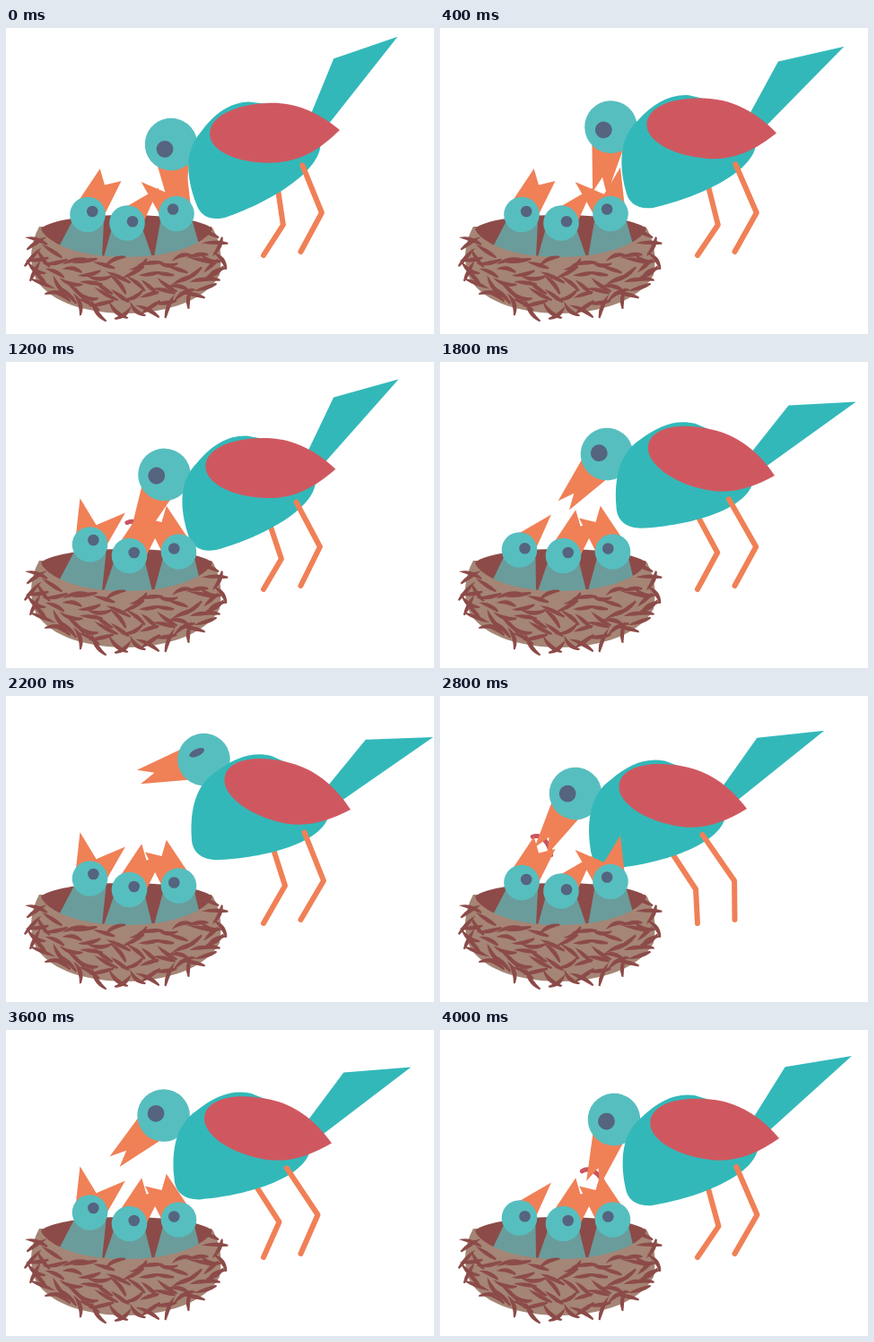
These frames come from a looping animation (477 by 342 pixels, 4.2 s). An HTML page:

```html
<!DOCTYPE html>
<html lang="en">
<head>
<meta charset="utf-8">
<title>Feeding time</title>
<style>
  html, body { margin: 0; width: 100%; height: 100%; overflow: hidden; background: #fff; }
  svg { display: block; width: 477px; height: 342px; }
  .teal { fill: #33b8b9; }
  .pale { fill: #57bebf; }
  .orange { fill: #f08056; }
  .eye { fill: #55647f; }
  .dark { fill: #8c4b48; }
  .straw { fill: #a58575; }
  .down { fill: #6a9c9b; }
  .leg { fill: none; stroke: #f08056; stroke-width: 6; stroke-linecap: round; stroke-linejoin: round; }
</style>
</head>
<body>
<svg viewBox="0 0 477 342">
  <polyline id="farLeg" class="leg"/>
  <g id="head">
    <path id="worm" d="M66 16C58 10 62 -4 73 -12" fill="none" stroke="#c9545f" stroke-width="5" stroke-linecap="round"/>
    <path class="orange" d="M20 -18L75 -8L57 0L75 8L20 18Z"/>
    <circle class="pale" r="29.3"/>
    <circle id="open" class="eye" cx="4.6" cy="7.5" r="9.4"/>
    <ellipse id="shut" class="eye" rx="9" ry="4" transform="translate(5.6 9.5) rotate(-10)"/>
  </g>
  <g id="body">
    <path class="teal" d="M68 -102L-4 -80L-31 -20L-40 10L-30 14Z"/>
    <path class="teal" d="M-22 10C-18 43 -78 77 -130 93C-147 97 -159 91 -163 76C-173 46 -174 17 -155 -3C-139 -23 -122 -35 -100 -35L-50 -27Z"/>
    <path fill="#cf5860" d="M0 0C-25 -23 -52 -33 -77 -33C-116 -33 -145 -20 -145 0C-145 18 -116 34 -75 34C-44 34 -22 20 0 0Z"/>
  </g>
  <polyline id="nearLeg" class="leg"/>
  <path class="straw" d="M37 222C27 240 25 262 33 280C50 309 95 319 135 319C180 318 222 305 238 276C242 255 238 235 229 222Z"/>
  <path class="dark" d="M39 224C62 204 206 204 230 224C226 242 185 256 134 256C82 256 43 242 39 224Z"/>
  <g id="chicks"></g>
  <path class="straw" d="M37 222C45 240 78 256 134 256C186 256 222 241 231 224L238 262L134 300L31 262Z"/>
  <g id="twigs" class="dark"></g>
</svg>
<script>
const STEP = 200;
const $ = id => document.getElementById(id);
const rad = deg => deg * Math.PI / 180;
const mix = (a, b, k) => a + (b - a) * k;

// x, y, tilt: wing tip and body angle; hx, hy, beak: head and beak angle
const pose = (x, y, tilt, hx, hy, beak) => ({ x, y, tilt, hx, hy, beak });
const up = pose(384, 127, 15, 220.5, 71, 165);
const leanRight = pose(378, 121, 7.6, 194, 100, 108);
const feedRight = pose(372, 114, -2, 184, 130, 84);
const leanMid = pose(373, 127, 14, 186, 103, 130);
const feedMid = pose(359, 116, -2, 166, 139, 102);
const leanLeft = pose(342, 126, 11, 151, 109, 121);
const feedLeft = pose(342, 126, 11, 140, 135, 113);

// one feeding trip per chick, in steps
const route = [
  [0, feedRight], [1, feedRight], [3, leanRight], [4, up],
  [7, feedMid], [8, feedMid], [9, leanMid], [10, up], [11, up],
  [14, leanLeft], [15, feedLeft], [16, feedLeft], [17, leanLeft], [19, up],
  [20, leanRight], [21, feedRight]
];
const LOOP = 21;

// how wide each chick gapes: 0 shut, 1 ajar, 2 wide
const moods = { A: [1, 0, 2], B: [0, 1, 1], C: [2, 1, 1] };
const calls = 'ACACBACACBACABACABCAB';

function chick(gape, i) {
  const side = i < 2 ? 1 : -1;
  const x = [88.5, 135, 195][i] + side * 2.5 * gape;
  const y = [210, 218, 213.5][i] - 1.5 * gape ** 2;
  const at = (r, deg) => `${x + side * r * Math.cos(rad(deg))} ${y + r * Math.sin(rad(deg))}`;
  const dir = -48 - 12 * gape, half = 15 * gape;
  const [ex, ey] = at(6.3, -16 - 18 * gape).split(' ');
  const base = 80 + 56 * i;
  return [
    `<path class="down" d="M${x - 18} ${y + 9}L${base - 27} 256H${base + 27}L${x + 18} ${y + 9}Z"/>`,
    `<path class="orange" d="M${at(17, dir - 90)}L${at(53, dir - half)}L${at(53 - 15 * gape, dir)}L${at(53, dir + half)}L${at(17, dir + 90)}Z"/>`,
    `<circle class="pale" cx="${x}" cy="${y}" r="19.8"/><circle class="eye" cx="${ex}" cy="${ey}" r="6.3"/>`
  ];
}

// all bodies first, then beaks, then heads
function brood(gapes) {
  const parts = gapes.map(chick);
  return [0, 1, 2].map(layer => parts.map(p => p[layer]).join('')).join('');
}

function weave() {
  let seed = 23, out = '';
  const rnd = () => (seed = seed * 16807 % 2147483647) / 2147483647;
  const twig = (x, y, deg) => {
    const l = 11 + rnd() * 4, b = (rnd() - .5) * 16;
    out += `<path transform="translate(${x} ${y}) rotate(${deg})" d="M${-l} 0Q0 ${b - 4} ${l} -1L${l} 1Q0 ${b + 4} ${-l} 0Z"/>`;
  };
  const rows = 5, cols = 12;
  for (let r = 0; r < rows; r++) {
    for (let c = 0; c < cols; c++) {
      const t = -1 + 2 * (c + .2 + rnd() * .6) / cols;
      const arc = Math.sqrt(1 - t * t);
      const y = mix(230 + 31 * arc, 264 + 50 * arc, (r + rnd() * .5) / (rows - .6));
      twig(134 + t * 104, y, -t * 20 + (rnd() - .4) * 80);
    }
  }
  // loose ends along the outline
  for (let deg = -28; deg <= 208; deg += 15) {
    const x = 134 + 104 * Math.cos(rad(deg)), y = 258 + 60 * Math.sin(rad(deg));
    twig(x, y, deg + (rnd() < .5 ? 50 : -50));
  }
  $('twigs').innerHTML = out;
}

const place = (id, x, y, deg) => $(id).setAttribute('transform', `translate(${x} ${y}) rotate(${deg})`);
const show = (id, on) => { $(id).style.display = on ? '' : 'none'; };

function draw(n) {
  const i = route.findIndex(([end]) => end > n);
  const [t0, from] = route[i - 1], [t1, to] = route[i];
  const k = (n - t0) / (t1 - t0);
  // the head leads on the way down and trails on the way up
  const bend = to === up ? k ** 1.5 : 1 - (1 - k) ** 1.5;
  const p = {};
  for (const key in up) p[key] = mix(from[key], to[key], key === 'x' || key === 'y' ? k : bend);

  const cos = Math.cos(rad(p.tilt)), sin = Math.sin(rad(p.tilt));
  const onBody = (x, y) => `${p.x + x * cos - y * sin},${p.y + x * sin + y * cos}`;
  const knee = 354 - (up.x - p.x) ** 2 * .0147;
  place('body', p.x, p.y, p.tilt);
  place('head', p.hx, p.hy, p.beak);
  $('nearLeg').setAttribute('points', `${onBody(-43, 38)} ${knee},206.5 328.5,250`);
  $('farLeg').setAttribute('points', `${onBody(-71, 66)} ${knee - 43},${220 - Math.max(0, p.tilt - 7)} 287,254`);

  const asleep = from === up && to !== up && k === 0;
  show('shut', asleep);
  show('open', !asleep);
  show('worm', to.hy > from.hy && !asleep);
  $('chicks').innerHTML = brood(moods[calls[n]]);
}

const start = performance.now();
let last = -1;
function tick() {
  const n = Math.floor((performance.now() - start) / STEP) % LOOP;
  if (n !== last) draw(last = n);
  requestAnimationFrame(tick);
}

weave();
tick();
</script>
</body>
</html>
```
